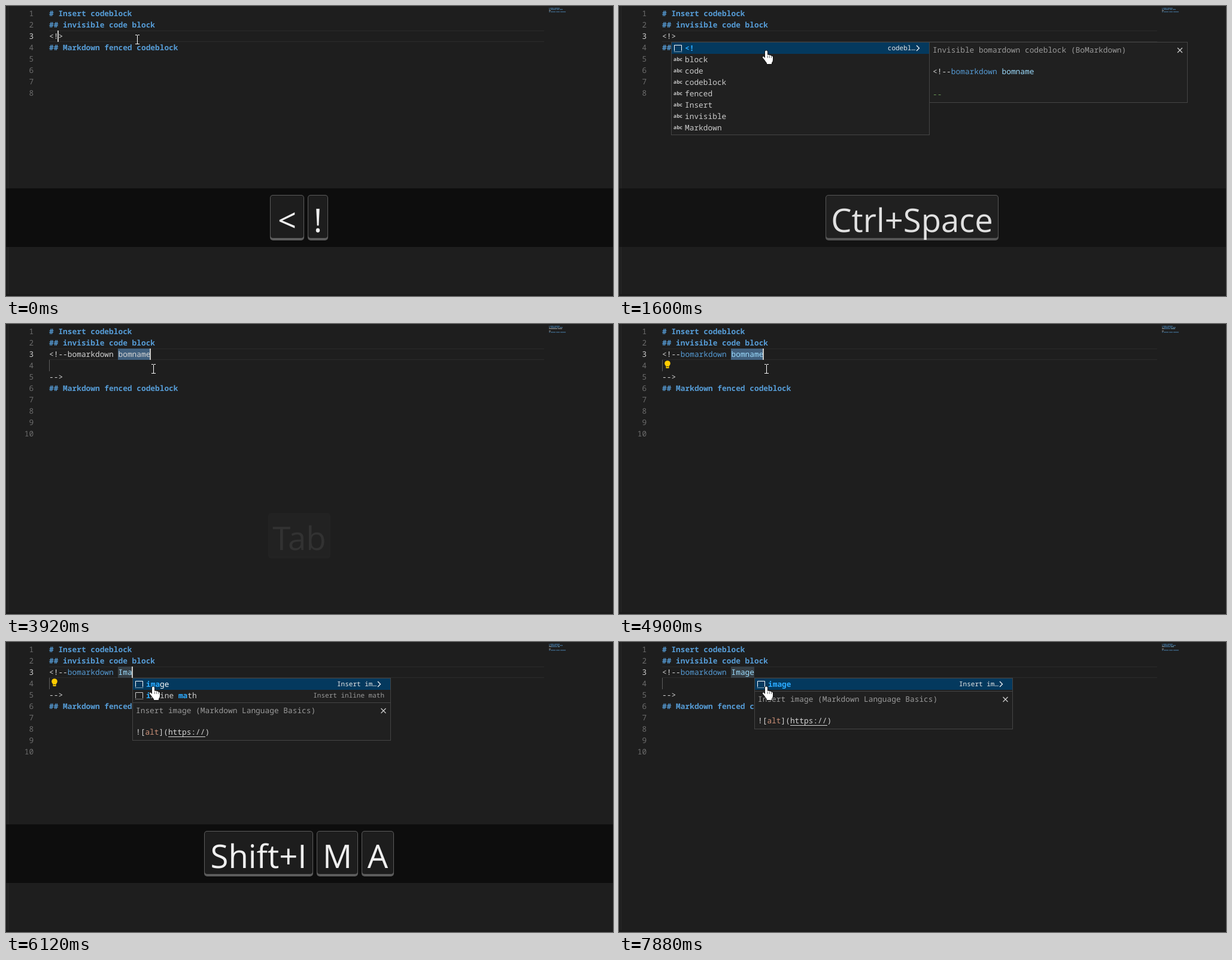
Animation, 1014 px wide and 485 px high, one loop 8 s. Source, as an HTML page with a canvas:

```html
<!DOCTYPE html>
<html lang="en">
<head>
<meta charset="utf-8">
<title>Insert codeblock</title>
<style>
html, body { margin: 0; width: 100%; height: 100%; overflow: hidden; background: #1e1e1e; }
canvas { display: block; }
</style>
</head>
<body>
<canvas id="stage" width="1014" height="485"></canvas>
<script>
const ctx = document.getElementById('stage').getContext('2d');
const LOOP = 8000;
const MONO = '"Noto Sans Mono", "DejaVu Sans Mono", monospace';
const SANS = '"Open Sans", "Noto Sans", sans-serif';
const EM = 12.833, SMALL = 11, CELL = 7.7, LEFT = 72, ROW = 19;
const PLAIN = '#d4d4d4', BLUE = '#569cd6', PALE = '#9cdcfe', MATCH = '#2aaaff';

// Times at which the caret turns on, off, on, ...
const BLINK = [0, 540, 1070, 1600, 2000, 2580, 2960, 3510, 3920, 4470, 4900, 5450, 5700, 6890, 7450, 7880];

// [start, key caps, opacity]
const KEYS = [
  [0, ['<', '!'], 1], [820, [], 0],
  [1340, ['Ctrl+Space'], .1], [1470, ['Ctrl+Space'], .55], [1600, ['Ctrl+Space'], .93], [2430, [], 0],
  [3920, ['Tab'], .08], [4060, ['Tab'], .55], [4190, ['Tab'], 1], [4750, [], 0],
  [5700, ['Shift+I'], .1], [5830, ['Shift+I'], .93], [5980, ['Shift+I', 'M'], 1],
  [6120, ['Shift+I', 'M', 'A'], 1], [6390, ['Shift+I', 'M', 'A', 'G', 'E'], 1], [7170, [], 0]
];
const CAP_WIDTH = { '<': 57, '!': 34, 'Ctrl+Space': 289, 'Tab': 104, 'Shift+I': 182, M: 69, A: 54, G: 56, E: 46 };

const WORDS = [[0, 'bomname'], [5700, 'I'], [5980, 'Im'], [6120, 'Ima'], [6390, 'Image']];

// Each entry: label, matched letter positions, detail (snippets only)
const WORD_LIST = ['block', 'code', 'codeblock', 'fenced', 'Insert', 'invisible', 'Markdown'].map(w => [w, []]);
const IMAGE = 'Insert im…', MATH = 'Insert inline math';
const SUGGEST = {
  I: [['image', [0], IMAGE], ['inline math', [0], MATH], ['italic', [0], 'Insert italic text'],
      ['Insert', [0]], ['invisible', [0]]],
  Im: [['image', [0, 1], IMAGE], ['inline math', [0, 7], MATH]],
  Ima: [['image', [0, 1, 2], IMAGE], ['inline math', [0, 7, 8], MATH]],
  Image: [['image', [0, 1, 2, 3, 4], IMAGE]]
};

const at = (list, t) => list.filter(e => e[0] <= t).pop();

function rect(x, y, w, h, color) {
  ctx.fillStyle = color;
  ctx.fillRect(x, y, w, h);
}

function stroke(color, width, ...points) {
  ctx.strokeStyle = color;
  ctx.lineWidth = width;
  ctx.beginPath();
  points.forEach(([x, y], i) => i ? ctx.lineTo(x, y) : ctx.moveTo(x, y));
  ctx.stroke();
}

// Runs of [string, colour, bold] on the monospace grid
function write(runs, x, y, size = EM) {
  for (const [s, color, bold] of runs) {
    ctx.font = `${bold ? 'bold ' : ''}${size}px ${MONO}`;
    ctx.fillStyle = color;
    ctx.fillText(s, x, y);
    x += s.length * size * .6;
  }
}

function frame(x, y, w, h) {
  rect(x, y, w, h, '#202020');
  ctx.strokeStyle = '#454545';
  ctx.lineWidth = 1;
  ctx.strokeRect(x + .5, y + .5, w - 1, h - 1);
}

function closeMark(x, y) {
  stroke('#cccccc', 1.2, [x - 4, y - 4], [x + 4, y + 4]);
  stroke('#cccccc', 1.2, [x + 4, y - 4], [x - 4, y + 4]);
}

function documentLines(t, word) {
  const head = s => [[s, BLUE, true]];
  const top = [head('# Insert codeblock'), head('## invisible code block')];
  const end = head('## Markdown fenced codeblock');
  if (t < 3920) return [...top, [['<!>', PLAIN]], end, [], [], [], []];
  const lit = t >= 4060;
  const open = [['<!--', PLAIN], ['bomarkdown', lit ? BLUE : PLAIN], [' ', PLAIN], [word, lit ? PALE : PLAIN]];
  return [...top, open, [], [['-->', PLAIN]], end, [], [], [], []];
}

function minimap(lines) {
  ctx.globalAlpha = .55;
  lines.forEach((runs, row) => {
    let x = 907;
    for (const [s, color] of runs)
      for (const c of s) {
        if (c !== ' ') rect(x, 3 + row * 2, 1, 1.4, color);
        x++;
      }
  });
  ctx.globalAlpha = 1;
}

function bulb() {
  ctx.fillStyle = '#ffcc00';
  ctx.beginPath();
  ctx.arc(81, 66, 4.8, 0, Math.PI * 2);
  ctx.fill();
  rect(78.5, 69, 5, 5, '#ffcc00');
  rect(79.5, 71, 3, 1, '#1e1e1e');
}

function editor(t, word, caretX) {
  const open = t >= 3920;
  const lines = documentLines(t, word);
  rect(0, 0, 1014, 485, '#1e1e1e');
  rect(3, 0, 1, 482, '#2a2a2a');
  rect(0, 482, 1014, 3, '#1a1a1a');
  rect(LEFT, 41, 827, 1, '#2b2b2b');
  rect(LEFT, 59, 827, 1, '#2b2b2b');
  if (open) {
    rect(187, 41, caretX - 186, 19, word === 'bomname' ? '#41607e' : '#363e44');
    rect(LEFT, 60, 1, 19, '#5c5c5c');
  }
  lines.forEach((runs, i) => {
    const y = 17 + i * ROW, n = String(i + 1);
    write([[n, i === 2 ? '#cccccc' : '#6c6c6c']], 46.2 - n.length * CELL, y);
    write(runs, LEFT, y);
  });
  minimap(lines);
  if (t >= 4060 && t < 6640) bulb();
  if (BLINK.filter(b => b <= t).length % 2) rect(caretX, 41, 2, 19, '#c8c8c6');
}

function snippetIcon(x, y, color) {
  stroke(color, 1, [x + .5, y + 10], [x + .5, y + .5], [x + 12.5, y + .5], [x + 12.5, y + 10]);
  for (let i = 0; i < 13; i += 2) rect(x + i, y + 11, 1, 1, color);
}

function rows(items, x) {
  items.forEach(([label, hits, detail], i) => {
    const y = 61 + i * ROW, base = y + 14, first = i === 0;
    if (first) rect(x + 1, y, 430, ROW, '#04395e');
    if (detail) {
      snippetIcon(x + 5, y + 4, first ? '#ffffff' : '#cccccc');
      const edge = x + (first ? 408 : 421);
      write([[detail, first ? '#e8e8e8' : '#9a9a9a']], edge - detail.length * SMALL * .6, base - 1, SMALL);
      if (first) stroke('#ffffff', 1.2, [x + 410, y + 5], [x + 414.5, y + 9.5], [x + 410, y + 14]);
    } else {
      ctx.font = `bold 8.5px ${SANS}`;
      ctx.fillStyle = '#c5c5c5';
      ctx.fillText('abc', x + 4, base - 2);
    }
    const color = first ? '#ffffff' : '#cccccc';
    write([...label].map((c, k) => hits.includes(k) ? [c, MATCH, true] : [c, color]), x + 23, base);
  });
}

function tagPopup(withDocs) {
  frame(87, 60, 432, 156);
  rows([['<!', [0, 1], 'codebl…'], ...WORD_LIST], 87);
  if (!withDocs) return;
  frame(518, 60, 432, 102);
  write([['Invisible bomardown codeblock (BoMarkdown)', '#9a9a9a']], 524, 78);
  write([['<!--', PLAIN], ['bomarkdown', BLUE], [' ', PLAIN], ['bomname', PALE]], 524, 114);
  write([['--', '#6a9955']], 524, 152);
  closeMark(937, 74);
}

function wordPopup(word, x) {
  const items = SUGGEST[word], sep = 63 + items.length * ROW;
  if (word === 'I' || items) frame(x, 60, 432, sep + 4);
  rows(items, x);
  rect(x, sep, 432, 1, '#454545');
  write([['Insert image (Markdown Language Basics)', '#9a9a9a']], x + 6, sep + 18);
  write([['![', PLAIN], ['alt', '#ce9178'], ['](https://)', PLAIN]], x + 6, sep + 54);
  rect(x + 60, sep + 57, 62, 1, PLAIN);
  closeMark(x + 419.5, sep + 14);
}

function keyCaps(caps, alpha) {
  if (!caps.length) return;
  ctx.globalAlpha = alpha ** 6;
  rect(0, 305, 1014, 98, '#0d0d0d');
  ctx.globalAlpha = alpha;
  const total = caps.reduce((sum, c) => sum + CAP_WIDTH[c] + 6, -6);
  let x = Math.round(489.5 - total / 2);
  ctx.font = `54.4px ${SANS}`;
  ctx.textAlign = 'center';
  for (const cap of caps) {
    const w = CAP_WIDTH[cap];
    ctx.fillStyle = '#5c5c5c';
    ctx.beginPath();
    ctx.roundRect(x, 316, w, 76, 5);
    ctx.fill();
    ctx.fillStyle = '#1d1d1d';
    ctx.beginPath();
    ctx.roundRect(x + 1, 317, w - 2, 71, 4);
    ctx.fill();
    ctx.fillStyle = '#f0f0f0';
    ctx.fillText(cap, x + w / 2, 378);
    x += w + 6;
  }
  ctx.textAlign = 'left';
  ctx.globalAlpha = 1;
}

function beam(x, y) {
  rect(x, y - 7, 1, 15, '#ffffff');
  for (const dy of [-8, 7]) {
    rect(x - 3, y + dy, 3, 1, '#ffffff');
    rect(x + 1, y + dy, 3, 1, '#ffffff');
  }
}

function hand(x, y) {
  const p = new Path2D('M0 1.5Q0-.5 2-.5T4 1.5V7Q6 5.8 7.3 7.6Q9 6.8 10.3 8.6Q13 8 13 11V15' +
    'Q13 18 11 20V22H3V20.5Q1 18 -1 15L-4 11.5Q-4.6 9.3 -2.4 9.6L0 12Z');
  ctx.save();
  ctx.translate(x, y);
  ctx.strokeStyle = '#111111';
  ctx.lineWidth = 1.6;
  ctx.stroke(p);
  ctx.fillStyle = '#ffffff';
  ctx.fill(p);
  for (const k of [4, 7.2, 10.2]) rect(k, 8, .8, 4, '#444444');
  ctx.restore();
}

function draw(t) {
  const word = at(WORDS, t)[1];
  const column = t < 3920 ? 2 : 15 + word.length;
  const caretX = Math.round(LEFT + column * CELL) - 1;
  const tagOpen = t >= 1470 && t < 3920, wordOpen = t >= 5830;
  editor(t, word, caretX);
  const [, caps, alpha] = at(KEYS, t);
  keyCaps(caps, alpha);
  if (tagOpen) tagPopup(t >= 1600);
  if (wordOpen) wordPopup(word, caretX + 1);
  if (tagOpen || wordOpen) hand(244, 75);
  else if (t < 1470) beam(219, 56);
  else beam(246, 75);
}

ctx.textRendering = 'geometricPrecision';
const start = performance.now();
function tick() {
  draw((performance.now() - start) % LOOP);
  requestAnimationFrame(tick);
}
tick();
</script>
</body>
</html>
```
